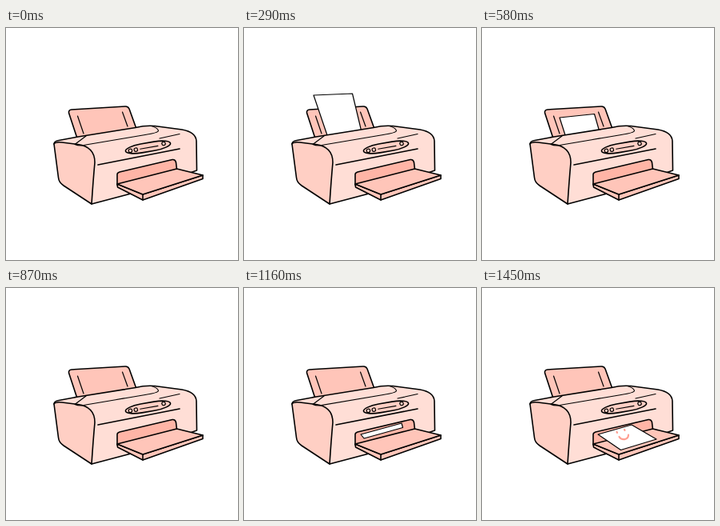
Write an HTML page that moves like this. It is 290 px wide and 290 px high and loops after 1740 ms.

```html
<!DOCTYPE html>
<html lang="en">
<head>
<meta charset="utf-8">
<title>Printer</title>
<style>
  html, body { margin: 0; width: 100%; height: 100%; overflow: hidden; background: #fff; }
  svg { display: block; width: 100vw; height: 100vh; }
  path, rect, circle { stroke: #000; stroke-width: 1.6; stroke-linecap: round; stroke-linejoin: round; }
  .line { fill: none; }
  .thin { stroke-width: 1.2; }
  .paper { fill: #fff; stroke-width: 1.2; }
  .side { fill: #ffcfc4; }
  .front { fill: #ffded6; }
  .tray { fill: #ffc5b9; }
  .deep { fill: #ffb5a6; }
  .face path { fill: none; stroke: #ff9f91; stroke-width: 2.2; }
  [data-step] { visibility: hidden; }
</style>
</head>
<body>
<svg viewBox="0 0 290 290">
  <!-- rear feeder -->
  <path class="tray" d="M89 138 L78.500 106 Q78 102.500 82 102 L149 98 Q152.500 97.800 154 101 L163 126 Z"/>
  <path class="line thin" d="M89.500 110 L97 132 M145.500 105 L152 123"/>
  <path class="paper" data-step="1" d="M87 84 L135.500 82 L147 130 L105 137 Z"/>
  <path class="paper" data-step="2" d="M97 112 L140.500 107.500 L147 130 L105 137 Z"/>

  <!-- body -->
  <path class="front" d="M60 145 Q60 141.500 66 140.500 L90 136 L162 124.500 Q174 121.500 186 122.500 L220 127 Q237 130 238 141 L238.500 178 L160 206 L107 220 L80 165 Z"/>
  <path class="side" d="M60 145 Q62 142 70 143 L90 145.500 C104 147.500 111 155 111 168 Q109 190 107 220 L72 197 Q66 193 65.500 187 Z"/>
  <path class="line thin" d="M100 135 L86 145.500 Q89 147 94 147 L174 133.500 Q190 131 190.500 128.500 Q190 125 182 122.500"/>
  <path class="line thin" d="M192 138 L217 132.500"/>
  <path class="line" d="M115 171 L217 151"/>

  <!-- controls -->
  <g transform="rotate(-10 177.500 149)">
    <rect class="side" x="149" y="143.500" width="57" height="11" rx="20" ry="5.500"/>
    <circle class="side thin" cx="155" cy="149.500" r="2.200"/>
    <circle class="side thin" cx="162" cy="149.500" r="2.200"/>
    <circle class="side thin" cx="197.500" cy="148" r="2.200"/>
    <path class="line thin" d="M167.500 149.500 H190"/>
  </g>

  <!-- outlet -->
  <path class="deep" d="M139 196 V183 Q139 181 142 180 L208 164.500 Q211.500 164 212.500 168 L213.500 177 Z"/>
  <path class="paper" data-step="4" d="M146 183 L197 169 L198.500 174.500 L150 188 Z"/>
  <path class="tray" d="M139 195 L139.500 199 L171 215 L246 188.500 L246 184 L171 208 Z"/>
  <path class="tray" d="M139 195 L213.500 176 L246 184 L171 208 Z"/>
  <path class="line" d="M171 208 V215"/>
  <g data-step="5">
    <path class="paper" d="M145 183 L187 171 L218 189 L173.500 202.500 Z"/>
    <g class="face">
      <path d="M168.500 180 L169 180.800 M178 177 L178.500 177.800"/>
      <path d="M171.500 186 C174.500 191 183 190 183 183.500"/>
    </g>
  </g>
</svg>
<script>
  const STEP = 290, STEPS = 6;
  const parts = document.querySelectorAll('[data-step]');
  const start = performance.now();

  function draw(now) {
    const step = Math.floor(Math.max(0, now - start) / STEP) % STEPS;
    for (const part of parts) {
      part.style.visibility = +part.dataset.step === step ? 'visible' : 'hidden';
    }
    requestAnimationFrame(draw);
  }
  draw(start);
</script>
</body>
</html>
```
